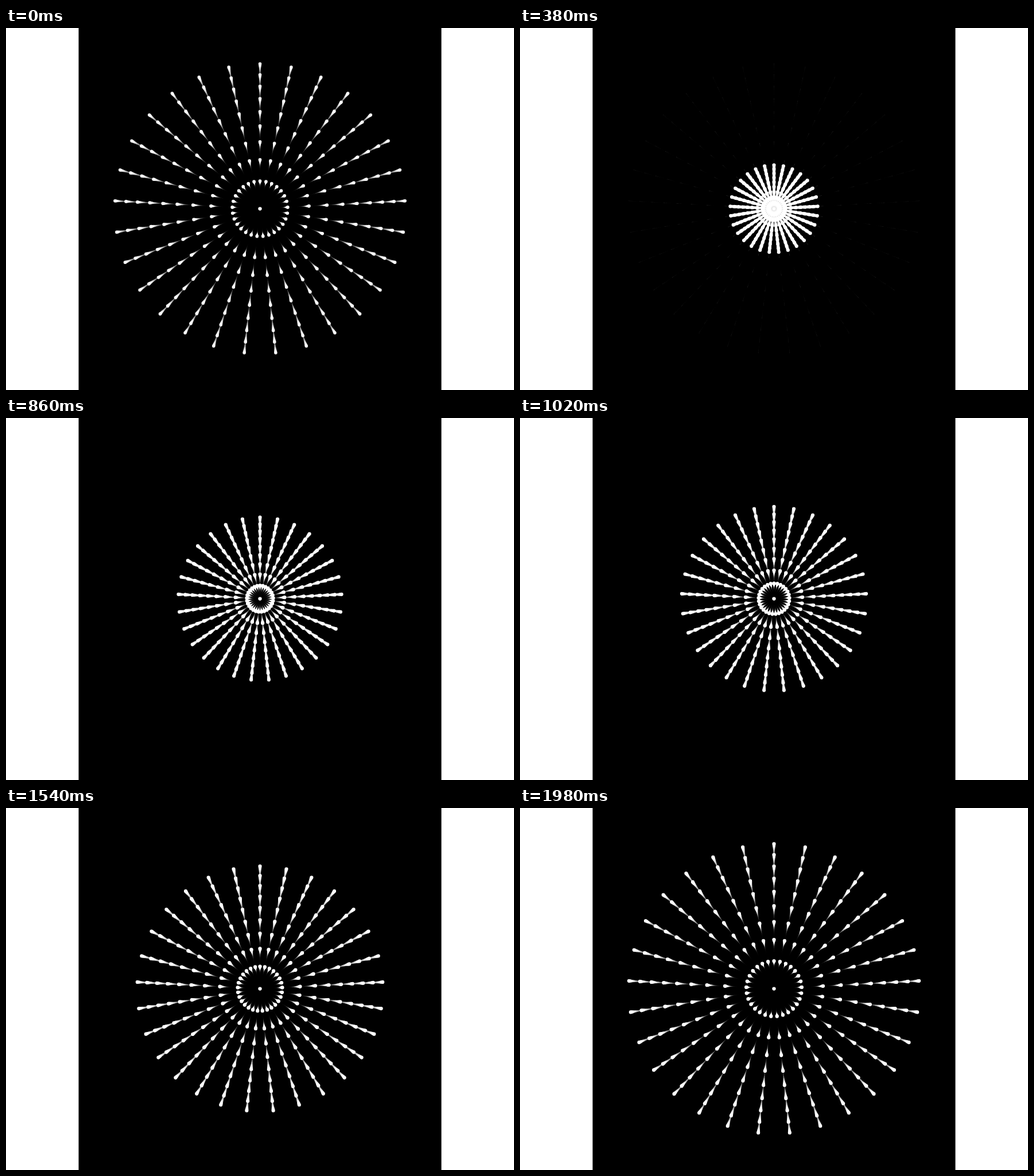
These frames come from a looping animation (885x632 px, 2000 ms). An HTML page with a canvas:

```html
<!DOCTYPE html>
<html>
<head>
<meta charset="utf-8">
<style>
  html, body { margin: 0; width: 100%; height: 100%; overflow: hidden; background: #fff; }
  canvas { display: block; }
</style>
</head>
<body>
<canvas id="stage" width="885" height="632"></canvas>
<script>
const ctx = document.getElementById('stage').getContext('2d');
const STEPS = 100, STEP_MS = 20;
const SPOKES = 29, RINGS = 9;
const CX = 442.5, CY = 315.5, DOT = 3.1;
const TRAIL = 32, SHRINK = 0.91, FADE = 0.92;

// Distance of a ring from the centre at a given step
const reach = (ring, step) => 117 * (Math.sqrt(1 + ring * step / (STEPS - 1)) - 1);

function addDot(x, y, r) {
  ctx.moveTo(x + r, y);
  ctx.arc(x, y, r, 0, 2 * Math.PI);
}

function drawBurst(step, age) {
  const r = DOT * SHRINK ** age;
  ctx.globalAlpha = FADE ** age;
  ctx.beginPath();
  addDot(CX, CY, r);
  for (let ring = 1; ring <= RINGS; ring++) {
    const d = reach(ring, step);
    for (let s = 0; s < SPOKES; s++) {
      const a = 2 * Math.PI * s / SPOKES;
      addDot(CX + d * Math.sin(a), CY - d * Math.cos(a), r);
    }
  }
  ctx.fill();
}

function draw(step) {
  ctx.globalAlpha = 1;
  ctx.fillStyle = '#fff';
  ctx.fillRect(0, 0, 885, 632);
  ctx.fillStyle = '#000';
  ctx.fillRect(126.5, 0, 632, 632);
  ctx.fillStyle = '#fff';
  // Older bursts, smaller and dimmer, form the tails
  for (let age = TRAIL; age >= 0; age--) drawBurst((step - age + STEPS) % STEPS, age);
}

let start, shown = -1;
function tick(now) {
  start ??= now;
  const step = Math.floor((now - start) / STEP_MS) % STEPS;
  if (step !== shown) draw(shown = step);
  requestAnimationFrame(tick);
}
requestAnimationFrame(tick);
</script>
</body>
</html>
```
